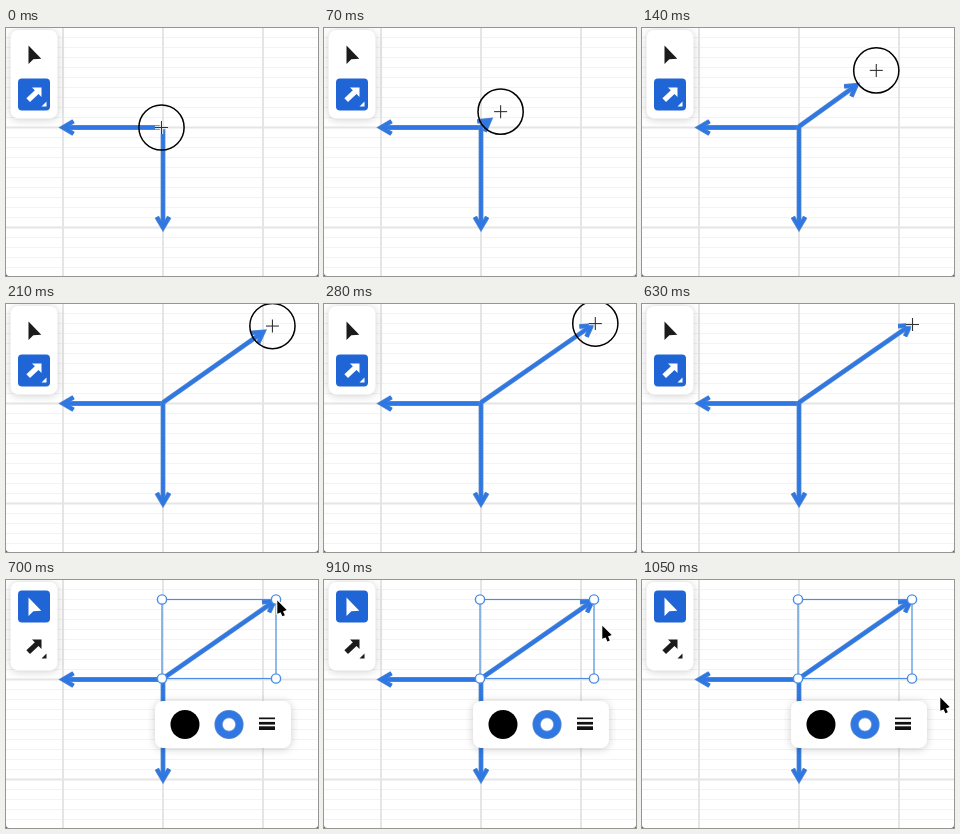
Animation, 312 px wide and 248 px high, one loop 1400 ms. Source, as an HTML page with a canvas:

```html
<!DOCTYPE html>
<html lang="en">
<head>
<meta charset="utf-8">
<title>Drawing an arrow</title>
<style>
  html, body { margin: 0; width: 100%; height: 100%; overflow: hidden; background: #fff; }
  canvas { display: block; width: 312px; height: 248px; }
</style>
</head>
<body>
<canvas id="stage" width="312" height="248"></canvas>
<script>
const ctx = document.getElementById('stage').getContext('2d');
const W = 312, H = 248, LOOP = 1400, STEP = 70, TAU = Math.PI * 2;
const BLUE = '#2f78e4', EDGE = '#5c8bcb', FRAME = '#4c8de0', ACTIVE = '#1f65d5', DARK = '#1b1b1b';
const DROP = 630, SELECT = 700, LEAVE = 840, LEAVE_TIME = 210;

const mix = (a, b, p) => a + (b - a) * p;
const smooth = u => u * u * (3 - 2 * u);
// Slow start, quick sweep, soft settling
const settle = (t, scale, power) => 1 - Math.exp(-Math.pow(t / scale, power));

function penAt(t) {
  const shift = t >= DROP ? 1 : 0;
  return [
    mix(155.5, 271.5, settle(t, 133, 2.5)) - shift,
    mix(99.5, 19.5, settle(t, 128, 2.5)) + shift
  ];
}

const tipAt = t => [
  mix(157, 271.5, settle(t, 155, 2.8)),
  mix(98.5, 19, settle(t, 152, 2.8))
];

function mouseAt(t) {
  const p = smooth(Math.min(1, Math.max(0, (t - LEAVE) / LEAVE_TIME)));
  return [mix(271.3, 298.3, p), mix(20.5, 117.5, p)];
}

function trace(points, close) {
  ctx.beginPath();
  points.forEach(([x, y]) => ctx.lineTo(x, y));
  if (close) ctx.closePath();
}

function stroke(points, color, width) {
  trace(points);
  ctx.strokeStyle = color;
  ctx.lineWidth = width;
  ctx.stroke();
}

function fill(points, color) {
  trace(points, true);
  ctx.fillStyle = color;
  ctx.fill();
}

function disc(x, y, r, color, line, width) {
  ctx.beginPath();
  ctx.arc(x, y, r, 0, TAU);
  if (color) { ctx.fillStyle = color; ctx.fill(); }
  if (line) { ctx.strokeStyle = line; ctx.lineWidth = width; ctx.stroke(); }
}

function box(x, y, w, h, r, color) {
  ctx.beginPath();
  ctx.roundRect(x, y, w, h, r);
  ctx.fillStyle = color;
  ctx.fill();
}

function panel(x, y, w, h) {
  ctx.save();
  ctx.shadowColor = 'rgba(0,0,0,.2)';
  ctx.shadowBlur = 9;
  ctx.shadowOffsetY = 1;
  box(x, y, w, h, 8, '#fff');
  ctx.restore();
}

function grid() {
  ctx.fillStyle = '#fff';
  ctx.fillRect(0, 0, W, H);
  ctx.fillStyle = '#f3f3f3';
  for (let y = 9; y < H; y += 10) ctx.fillRect(0, y, W, 1);
  ctx.fillStyle = '#e5e5e5';
  for (let x = 56; x < W; x += 100) ctx.fillRect(x, 0, 2, H);
  for (let y = 98.5; y < H; y += 100) ctx.fillRect(0, y, W, 2);
}

function arrow(x0, y0, x1, y1) {
  const len = Math.hypot(x1 - x0, y1 - y0), v = len - 4;
  if (len < 5) return;
  ctx.save();
  ctx.translate(x0, y0);
  ctx.rotate(Math.atan2(y1 - y0, x1 - x0));
  for (const [color, width] of [[EDGE, 4.8], [BLUE, 3.4]]) {
    stroke([[0, 0], [v, 0]], color, width);
    stroke([[v - 10.5, -6.2], [v, 0], [v - 10.5, 6.2]], color, width);
  }
  ctx.restore();
}

function toolbar(selecting) {
  const pick = selecting ? '#fff' : DARK, line = selecting ? DARK : '#fff';
  panel(4.5, 2, 47, 88.5);
  box(12, selecting ? 10.5 : 50.5, 32, 32, 4, ACTIVE);
  fill([[22.5, 17.5], [22.5, 36], [27.3, 31.2], [35.3, 30.8]], pick);
  // Line tool: shaft, head and menu corner
  stroke([[22.2, 72.2], [32, 62.8]], line, 5.2);
  fill([[26, 59.5], [35.5, 59.5], [35.5, 69]], line);
  fill([[40.5, 73.5], [40.5, 78.5], [35.5, 78.5]], line);
}

function crosshair(x, y) {
  for (const [color, width] of [['rgba(255,255,255,.85)', 3.4], ['#333', 1.1]]) {
    stroke([[x - 6.5, y], [x + 6.5, y]], color, width);
    stroke([[x, y - 6.5], [x, y + 6.5]], color, width);
  }
}

function selection() {
  const x0 = 156, y0 = 19.5, x1 = 270, y1 = 98.5;
  ctx.strokeStyle = FRAME;
  ctx.lineWidth = 1.2;
  ctx.strokeRect(x0, y0, x1 - x0, y1 - y0);
  for (const x of [x0, x1])
    for (const y of [y0, y1]) disc(x, y, 4.6, '#fff', FRAME, 1.4);
}

function stylePanel() {
  panel(149, 121, 136, 47);
  disc(179, 144.5, 14.5, '#000');
  disc(223, 144.5, 14.6, EDGE);
  disc(223, 144.5, 13.8, BLUE);
  disc(223, 144.5, 6.7, '#fff', EDGE, 0.8);
  ctx.fillStyle = '#111';
  for (let i = 0; i < 3; i++) ctx.fillRect(253, 137.5 + i * 4.4, 16, 1.7 + i);
}

function mouse(x, y) {
  ctx.save();
  ctx.translate(x, y);
  ctx.lineJoin = 'round';
  const head = [[0, 0], [0, 13.2], [9.4, 9.4], [0, 0]];
  const tail = [[3.5, 9], [6.3, 15.3]];
  stroke(head, '#fff', 2.2);
  stroke(tail, '#fff', 4.6);
  fill(head, '#000');
  stroke(tail, '#000', 2.6);
  ctx.restore();
}

function corners() {
  ctx.beginPath();
  ctx.rect(0, 0, W, H);
  ctx.roundRect(0, -6, W, H + 6, 3);
  ctx.fillStyle = '#555';
  ctx.fill('evenodd');
}

function draw(t) {
  const selecting = t >= SELECT;
  grid();
  arrow(157, 99.5, 53, 99.5);
  arrow(157, 98, 157, 203.5);
  arrow(157, 98.5, ...tipAt(t));
  toolbar(selecting);
  if (selecting) {
    selection();
    stylePanel();
    mouse(...mouseAt(t));
  } else {
    const [x, y] = penAt(t);
    crosshair(x, y);
    if (t < DROP) disc(x, y, 22.6, null, '#000', 1.5);
  }
  corners();
}

const start = performance.now();
function tick() {
  const t = Math.max(0, performance.now() - start) % LOOP;
  draw(Math.floor(t / STEP) * STEP);
  requestAnimationFrame(tick);
}
tick();
</script>
</body>
</html>
```
